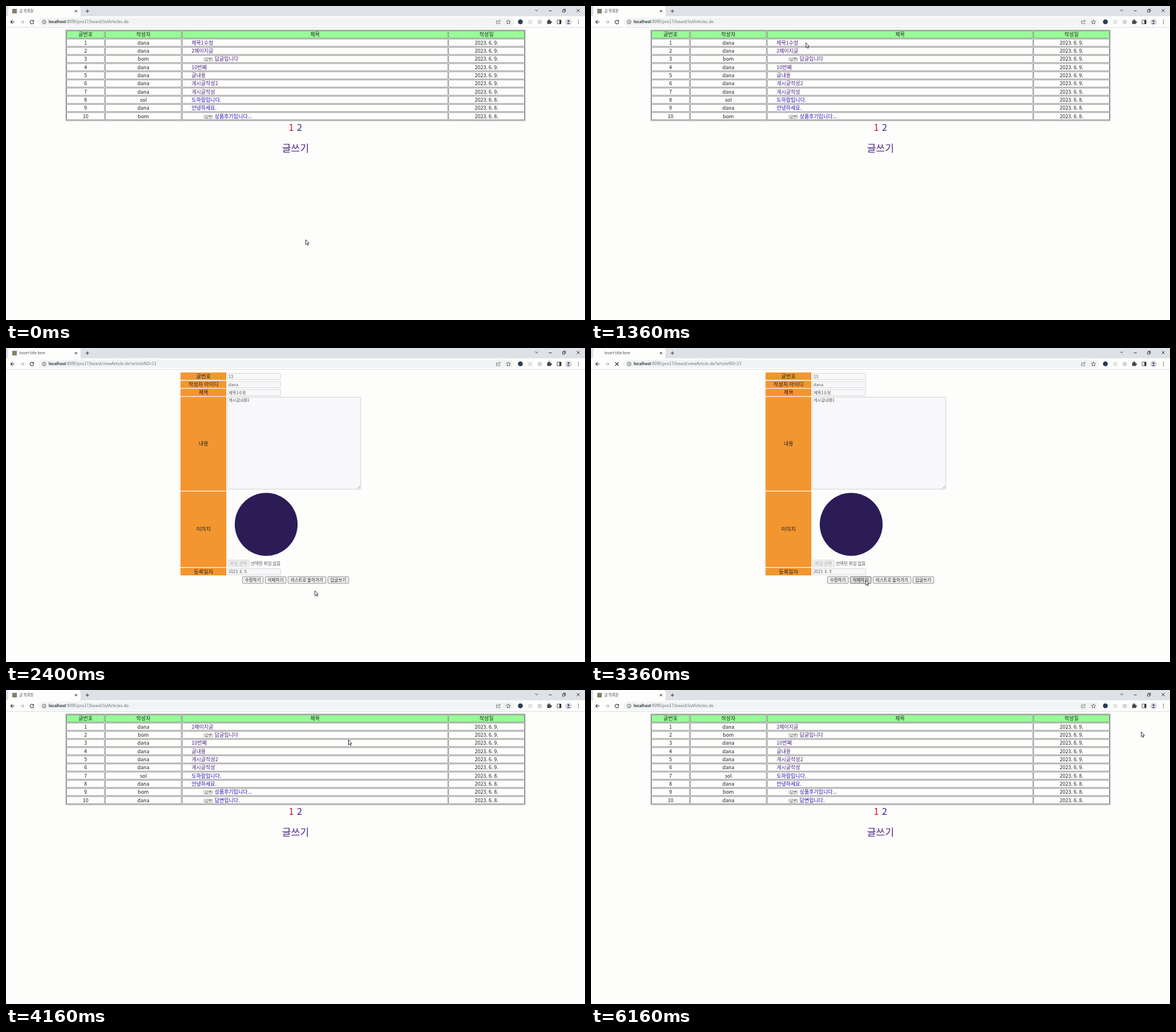
An HTML page with a canvas for the animation above (6.24 s loop, 1017x551 px).

```html
<!DOCTYPE html>
<html lang="ko">
<head>
<meta charset="utf-8">
<style>
html, body { margin: 0; width: 100%; height: 100%; overflow: hidden; background: #fdfdfc; }
canvas { display: block; }
</style>
</head>
<body>
<canvas id="stage" width="1017" height="551"></canvas>
<script>
const c = document.getElementById('stage').getContext('2d');
const LOOP = 6240;
const SANS = '"Noto Sans CJK KR", "Noto Sans CJK JP", "Noto Sans CJK", sans-serif';
const MONO = '"Noto Sans Mono CJK KR", "Noto Sans Mono CJK JP", monospace';
const VISITED = '#4b2583', UNVISITED = '#2412b4', INK = '#202124', PAPER = '#fdfdfc';

// Board rows: author, title, day, is reply, link colour
const posts = [
  ['dana', '제목1수정', 9, 0, VISITED],
  ['dana', '2페이지글', 9, 0, VISITED],
  ['bom', '답글입니다', 9, 1, VISITED],
  ['dana', '10번째', 9, 0, VISITED],
  ['dana', '글내용', 9, 0, VISITED],
  ['dana', '게시글작성2', 9, 0, VISITED],
  ['dana', '게시글작성', 9, 0, VISITED],
  ['sol', '도하람입니다.', 8, 0, UNVISITED],
  ['dana', '안녕하세요.', 8, 0, UNVISITED],
  ['bom', '상품후기입니다...', 8, 1, UNVISITED],
  ['dana', '답변입니다.', 8, 1, UNVISITED],
];
const columns = [[106.5, 173], [174.5, 308], [309.5, 776], [777.5, 910.5]];
const buttons = [[415, 37, '수정하기'], [455, 37, '삭제하기'], [495, 67, '리스트로 돌아가기'], [565, 37, '답글쓰기']];

// Pointer path: time, x, y
const path = [
  [0, 526, 409.5], [640, 526, 409.5], [1000, 421, 150], [1160, 421, 148], [1360, 377, 64],
  [1700, 344, 63], [1860, 343, 63], [2100, 420, 215], [2400, 542, 425], [2470, 551, 458],
  [2520, 553, 457], [2760, 588, 408], [2900, 588, 408], [3200, 485, 407], [3360, 482, 407],
  [3540, 482, 401], [3800, 522.5, 215], [4040, 601, 88], [4180, 601, 87], [4700, 400, 88],
  [5000, 337.5, 64], [5230, 337.5, 64], [5500, 600, 262], [5800, 1005, 95], [5900, 992, 80],
  [6160, 966, 73], [LOOP, 966, 73],
];

function pointerAt(t) {
  const i = path.findIndex(p => p[0] > t);
  const [t0, x0, y0] = path[i - 1], [t1, x1, y1] = path[i];
  const k = (t - t0) / (t1 - t0);
  return [x0 + (x1 - x0) * k, y0 + (y1 - y0) * k];
}

function text(s, x, y, size, color = INK, align = 'left', family = SANS) {
  c.font = `${size}px ${family}`;
  c.fillStyle = color;
  c.textAlign = align;
  c.textBaseline = 'alphabetic';
  c.fillText(s, x, y + size * 0.36);
}

function box(x, y, w, h, fill, stroke, r = 0) {
  c.beginPath();
  c.roundRect(x, y, w, h, r);
  if (fill) { c.fillStyle = fill; c.fill(); }
  if (stroke) { c.strokeStyle = stroke; c.lineWidth = 0.8; c.stroke(); }
}

function shape(d, stroke, fill, x = 0, y = 0, width = 1) {
  const p = new Path2D(d);
  c.save();
  c.translate(x, y);
  if (fill) { c.fillStyle = fill; c.fill(p); }
  if (stroke) { c.strokeStyle = stroke; c.lineWidth = width; c.stroke(p); }
  c.restore();
}

function dot(x, y, r, fill, stroke) {
  box(x - r, y - r, 2 * r, 2 * r, fill, stroke, r);
}

function chrome(title, url, icon, loading) {
  box(0, 0, 1017, 18, '#dee1e6');
  box(4, 0, 127, 20, PAPER, null, [4, 4, 0, 0]);
  box(0, 18, 1017, 19, PAPER);
  box(0, 37, 1017, 1, '#dcdee1');

  if (icon === 'square') box(11, 5, 8, 8, '#857f6a');
  if (icon === 'circle') dot(15, 9, 4, '#71858f');
  c.save();
  c.beginPath();
  c.rect(22, 0, 94, 18);
  c.clip();
  text(title, 23.5, 8.8, 6.4, '#45484c');
  c.restore();
  shape('M-2-2L2 2M2-2L-2 2', '#333', null, 123, 9);
  shape('M-3 0H3M0-3V3', '#333', null, 143, 9);

  shape('M-2.5-1.2L0 1.3L2.5-1.2', '#333', null, 932, 7.5);
  shape('M-2.5 0H2.5', '#333', null, 956, 8.5);
  shape('M-2.5-1H1.3V2.8H-2.5ZM-1-1V-2.5H2.7V1.3H1.3', '#333', null, 980, 8, 0.9);
  shape('M-2.6-2.6L2.6 2.6M2.6-2.6L-2.6 2.6', '#333', null, 1005, 8);

  const arrow = 'M3.5 0H-3M0-3.2L-3.2 0L0 3.2';
  shape(arrow, '#333', null, 11.5, 28, 1.1);
  shape('M-3.5 0H3M0-3.2L3.2 0L0 3.2', '#b5b8bc', null, 28.5, 28, 1.1);
  if (loading) shape('M-3-3L3 3M3-3L-3 3', '#333', null, 45.5, 28, 1.1);
  else {
    shape('M2.6-1.7A3.2 3.2 0 1 0 3.1 1', '#333', null, 45.5, 28, 1.1);
    shape('M3.6-3.7V-.5H.4Z', null, '#333', 45.5, 28);
  }
  box(57, 20.5, 835, 14.5, '#f1f3f4', null, 7.2);
  dot(67, 28, 3.3, null, '#444');
  shape('M0-.5V2M0-2V-1.2', '#444', null, 67, 28);
  text(url, 75, 27.8, 7.1, '#686c71');
  text('localhost', 75, 27.8, 7.1);

  shape('M-1-2H-3.5V3H2.5V1M-1.5 1Q-1-2 2-2M1-4L3.5-2L1 0', '#666', null, 865, 28, 0.8);
  shape('M0-3.8L1.1-1.2L3.8-1L1.8.8L2.4 3.5L0 2.1L-2.4 3.5L-1.8.8L-3.8-1L-1.1-1.2Z', '#444', null, 882.5, 28, 0.8);
  dot(903.5, 27.8, 4.3, '#2d3a5a');
  box(917, 24.2, 7.5, 7.5, '#e5e6e8');
  dot(937.5, 28, 4, '#d5d6d8');
  shape('M-3.5-2H-1A1.3 1.3 0 1 1 1-2H3V0A1.3 1.3 0 1 1 3 2V4H-3.5V2A1.3 1.3 0 0 0-3.5 0Z', null, '#444', 954, 27.5);
  box(968, 24.7, 7, 6.5, null, '#333');
  box(972, 24.7, 3, 6.5, '#333');
  dot(988, 28, 5.8, '#d6dae0');
  dot(988, 26.4, 1.6, '#3c4560');
  shape('M-3 3.2Q0-.4 3 3.2Z', null, '#3c4560', 988, 28);
  for (const dy of [-3, 0, 3]) dot(1005.5, 28 + dy, 0.8, '#333');
}

function listPage(rows) {
  box(105.3, 42.3, 806.4, 158.9, null, '#666');
  const heads = ['글번호', '작성자', '제목', '작성일'];
  for (let r = 0; r <= 10; r++) {
    const mid = 50.2 + r * 14.32;
    for (const [left, right] of columns) {
      box(left, mid - 6.4, right - left, 12.6, r ? null : '#98fb98', '#747474');
    }
    const center = (s, i) => text(s, (columns[i][0] + columns[i][1]) / 2, mid, 9, '#222', 'center');
    if (!r) { heads.forEach(center); continue; }
    const [author, title, day, reply, color] = rows[r - 1];
    center(r, 0);
    center(author, 1);
    center(`2023. 6. ${day}.`, 3);
    if (reply) text('[답변]', 347, mid + 0.8, 6.5, '#333');
    text(title, reply ? 366.5 : 326, mid, 9, color);
  }
  text('1', 501, 213, 16.5, '#d01030', 'center');
  text('2', 515.5, 213, 16.5, VISITED, 'center');
  text('글쓰기', 508.5, 249.5, 17.2, VISITED, 'center');
}

function viewPage(px, py) {
  const labels = [
    ['글번호', 43, 13, '13'], ['작성자 아이디', 57.4, 12.8, 'dana'], ['제목', 71.6, 12.8, '제목1수정'],
    ['내용', 85.8, 164.6], ['이미지', 251.8, 132.6], ['등록일자', 385.8, 13.2, '2023. 6. 9.'],
  ];
  for (const [label, y, h, value] of labels) {
    box(306.5, y, 80.5, h, '#f3962f');
    text(label, 347, y + h / 2, 9.2, '#222', 'center');
    if (!value) continue;
    box(389.3, y + 1.4, 93, 10.8, '#f8f8fa', '#cdcdd2', 1);
    text(value, 391, y + 7, 7.2, '#555');
  }
  box(389.3, 86.2, 233.9, 161.6, '#f8f8fa', '#c8c8ca', 1);
  text('게시글내용1', 391, 91.3, 7.2, '#555', 'left', MONO);
  shape('M617.5 246.5L622 242M620 246.5L622 244.5', '#777', null, 0, 0, 0.7);
  dot(457, 309.5, 55.2, '#2b1c56');

  box(389.3, 372, 38, 12, '#efefef', '#d2d2d2', 1);
  text('파일 선택', 408.3, 378, 7.6, '#aaa', 'center');
  text('선택된 파일 없음', 430, 378, 7.6, '#555');
  for (const [x, w, label] of buttons) {
    const over = px >= x && px <= x + w && py >= 400 && py <= 413.5;
    box(x + 0.4, 401.2, w - 0.4, 11.8, over ? '#dcdcde' : '#efefef', over ? '#444' : '#777', 1.2);
    text(label, x + w / 2, 407.2, 7.5, '#222', 'center');
  }
}

function alertBox() {
  c.save();
  c.shadowColor = 'rgba(0,0,0,.4)';
  c.shadowBlur = 4;
  c.shadowOffsetY = 1;
  box(390, 36, 237, 68.3, '#fdfdfd', null, [0, 0, 2, 2]);
  c.restore();
  box(390, 36, 237, 68.3, null, '#c2c2c2', [0, 0, 2, 2]);
  text('localhost:8090 내용:', 398.5, 49.8, 7.9);
  text('글을 삭제했습니다.', 398.5, 65, 7.5, '#3c4043');
  box(584.2, 78.5, 35, 18, '#fdfdfd', '#1b4f9c', 2.5);
  box(586, 80, 31.5, 15, '#1a73e8', null, 1.5);
  text('확인', 601.7, 87.2, 7, '#fff', 'center');
}

function pointer(x, y, hand) {
  if (hand) shape('M-1 1Q0-.8 1 1V4.5L5 5.3Q6 5.7 5.8 7L5 11.8H-.3L-3.4 8Q-3.7 6.4-1 7.8Z', '#222', '#fff', x, y, 0.9);
  else shape('M.5.5V9L2.4 7.3L3.8 10.3L5.2 9.6L3.8 6.7H6.3Z', '#222', '#fff', x, y, 0.9);
}

function draw(now) {
  const t = now % LOOP;
  const [x, y] = pointerAt(t);
  const page = t < 1900 ? 'list' : t < 3600 ? 'view' : t < 4090 ? 'alert' : 'list';
  const base = 'localhost:8090/pro17/board/';
  const loading = t >= 3250 && t < 4090;

  c.fillStyle = PAPER;
  c.fillRect(0, 0, 1017, 551);
  if (page === 'list') {
    chrome('글 목록장', base + 'listArticles.do', 'square', false);
    listPage(posts.slice(t < 1900 ? 0 : 1));
  } else if (page === 'view') {
    chrome('Insert title here', base + 'viewArticle.do?articleNO=13', loading ? '' : 'square', loading);
    viewPage(x, y);
  } else {
    chrome(base + 'removeArticle.do', base + 'removeArticle.do', 'circle', true);
    alertBox();
  }
  pointer(x, y, page === 'list' && x > 326 && x < 365 && y > 58 && y < 72);
  requestAnimationFrame(draw);
}
requestAnimationFrame(draw);
</script>
</body>
</html>
```
